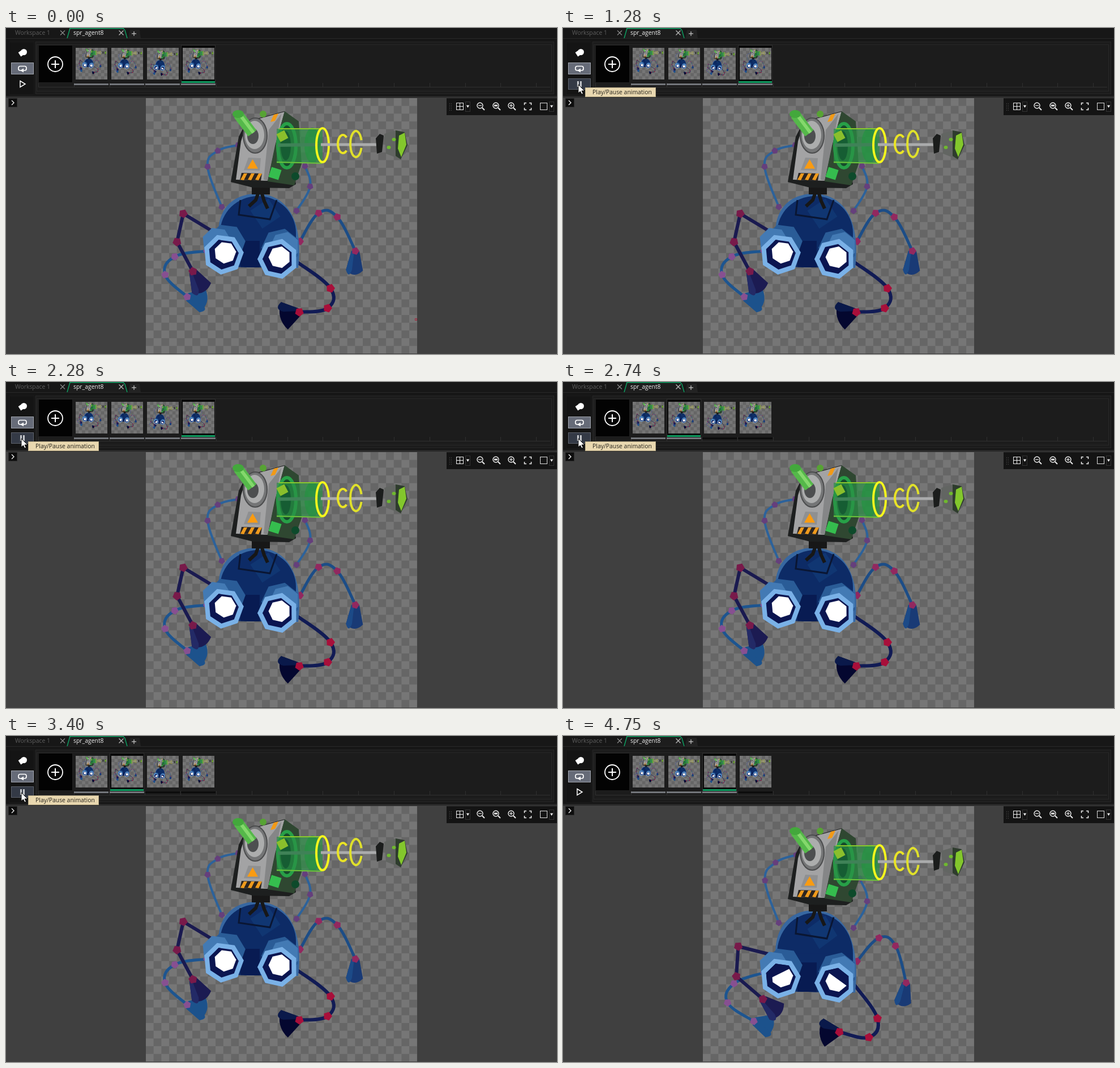
Recreate the animation shown at these times as an HTML page with a canvas. Size 973 px wide and 576 px high, loop 5.42 s.

```html
<!DOCTYPE html>
<html>
<head>
<meta charset="utf-8">
<style>
html, body { margin: 0; width: 100%; height: 100%; overflow: hidden; background: #404040; }
canvas { display: block; }
</style>
</head>
<body>
<canvas id="stage" width="973" height="576"></canvas>
<script>
const c = document.getElementById('stage').getContext('2d');
const LOOP = 5420, CELL = 13.68, PIXEL = 3.74;
const POSES = [-0.4, 0, 1, 0]; // 0 = middle, 1 = crouched
const { PI, sin, cos, floor, min, max } = Math;

const ease = v => { v = max(0, min(1, v)); return v * v * (3 - 2 * v); };

function box(x, y, w, h, fill, edge) {
  if (fill) { c.fillStyle = fill; c.fillRect(x, y, w, h); }
  if (edge) { c.lineWidth = 1; c.strokeStyle = edge; c.strokeRect(x + .5, y + .5, w - 1, h - 1); }
}
function trace(p) {
  c.beginPath();
  for (let i = 0; i < p.length; i += 2) c.lineTo(p[i], p[i + 1]);
}
function line(color, w, ...p) {
  trace(p);
  c.strokeStyle = color; c.lineWidth = w; c.stroke();
}
function shape(color, ...p) {
  trace(p);
  c.fillStyle = color; c.fill();
}
function ring(x, y, rx, ry, fill, edge, w = 1, gap = 0) {
  c.beginPath();
  c.ellipse(x, y, rx, ry, 0, gap, 2 * PI - gap);
  if (fill) { c.fillStyle = fill; c.fill(); }
  if (edge) { c.strokeStyle = edge; c.lineWidth = w; c.stroke(); }
}
function label(s, x, y, color) {
  c.font = '10.4px "Open Sans", sans-serif';
  c.fillStyle = color; c.fillText(s, x, y);
}
function checker(x, y, w, h, n) {
  box(x, y, w, h, '#666');
  c.fillStyle = '#767676';
  for (let j = 0; j * n < h; j++)
    for (let i = j % 2; i * n < w; i += 2) c.fillRect(x + i * n, y + j * n, n, n);
}
function shifted(dy, paint) {
  c.save(); c.translate(0, dy); paint(); c.restore();
}

// Regular polygon, first corner at angle rot.
function gon(x, y, r, n, rot) {
  return Array.from({ length: 2 * n }, (_, i) => {
    const a = rot + floor(i / 2) * 2 * PI / n;
    return i % 2 ? y + r * sin(a) : x + r * cos(a);
  });
}

// sag: how far the end moves in a crouch; bow: extra move of the middle.
const LIMBS = [
  { color: '#2c629b', joint: '#653f7c', w: 4, at: [[381, 316], [356, 245], [374, 217], [410, 207]], sag: [2, 3], bow: [0, 0], lift: 14 },
  { color: '#2c629b', joint: '#653f7c', w: 4, at: [[513, 323], [537, 280], [528, 244]], sag: [-4, 8], bow: [2, 0], lift: 16 },
  { color: '#1d5590', joint: '#875091', w: 5, at: [[355, 394], [298, 404], [281, 436], [320, 475]], sag: [17, 29], bow: [-2, 9], lift: 24,
    hand: { turn: [.25, .3], len: 28, half: 21, fill: '#1c528c', lit: '#1c528c' } },
  { color: '#1c4d87', joint: '#92285f', w: 5, at: [[519, 377], [552, 327], [585, 334], [617, 394]], sag: [-11, 42], bow: [11, 2], lift: 21,
    hand: { turn: [1.62, 1.75], len: 34, half: 15, fill: '#193a75', lit: '#1c4a87' } },
  { color: '#1a1a50', joint: '#781a4a', w: 6, at: [[366, 360], [313, 328], [302, 378], [330, 430]], sag: [23, 35], bow: [-13, 17], lift: 26, straight: true,
    hand: { turn: [1.09, .73], len: 33, half: 19, fill: '#1c1b52', lit: '#232a66' } },
  { color: '#111b55', joint: '#a80f3a', w: 6, at: [[515, 414], [573, 460], [568, 495], [518, 502]], sag: [-30, 21], bow: [-9, 17], lift: 26,
    hand: { turn: [2.9, 3.1], len: 27, half: 25, fill: '#04072f', lit: '#0a194a' } },
];

function drawHand([x, y], k, { turn, len, half, fill, lit }) {
  c.save();
  c.translate(x, y);
  c.rotate(turn[0] + (turn[1] - turn[0]) * k);
  for (const [color, side] of [[fill, -half], [lit, half * .3]]) {
    c.beginPath();
    c.moveTo(0, 7); c.lineTo(len, half);
    c.quadraticCurveTo(len + 16, (half + side) / 2, len, side);
    c.lineTo(0, side < 0 ? -7 : 2);
    c.fillStyle = color; c.fill();
  }
  c.restore();
}

function drawLimb({ color, joint, w, at, sag, bow, lift, straight, hand }, k) {
  const last = at.length - 1;
  const p = at.map(([x, y], i) => {
    const u = i / last, arc = sin(PI * u);
    return [x + k * (sag[0] * u + bow[0] * arc), y + k * (lift * (1 - u) + sag[1] * u + bow[1] * arc)];
  });
  const near = i => p[max(0, min(last, i))];
  const pull = straight ? 0 : 1 / 5;
  c.beginPath();
  c.moveTo(...p[0]);
  for (let i = 0; i < last; i++) {
    const [a, b, d, e] = [i - 1, i, i + 1, i + 2].map(near);
    c.bezierCurveTo(b[0] + (d[0] - a[0]) * pull, b[1] + (d[1] - a[1]) * pull,
      d[0] - (e[0] - b[0]) * pull, d[1] - (e[1] - b[1]) * pull, ...d);
  }
  c.strokeStyle = color; c.lineWidth = w; c.stroke();
  if (hand) drawHand(p[last], k, hand);
  for (const [x, y] of p.slice(hand && w > 5 ? 1 : 0)) shape(joint, ...gon(x, y, w + 2, 5, x));
}

function torso() {
  c.beginPath();
  c.moveTo(390, 422);
  c.bezierCurveTo(355, 345, 385, 293, 442, 293);
  c.bezierCurveTo(500, 293, 525, 345, 516, 424);
  c.fillStyle = '#3767a1'; c.fill();
  c.save();
  c.clip();
  ring(445, 362, 67, 65, '#0d2b66');
  box(378, 362, 134, 62, '#0d2b66');
  shape('#103672', ...gon(458, 328, 27, 4, .2));
  box(414, 376, 34, 50, '#081b52');
  c.restore();
  line('#0a1633', 3, 414, 304, 411, 330, 466, 338, 478, 304);
}

function eye(x, y, turn, tilt, k) {
  shape('#2a5c97', ...gon(x + 5, y - 20, 34, 7, turn));
  shape('#437ab4', ...gon(x + 12 * Math.sign(tilt), y - 22, 26, 7, turn));
  shape('#7ab1e7', ...gon(x, y, 36, 7, turn));
  shape('#0b1550', ...gon(x, y, 27, 7, turn));
  c.save();
  c.clip();
  shape('#fff', ...gon(x + 3, y - 3, 19.5, 7, turn));
  c.translate(x, y); c.rotate(tilt);
  box(-40, -40, 80, 15 + 17 * max(0, k), '#0b1550'); // eyelid
  c.restore();
}

function head() {
  box(434, 278, 32, 16, '#171717');
  line('#171717', 6, 446, 290, 441, 304, 429, 315);
  line('#171717', 6, 451, 290, 456, 306, 462, 319);
  shape('#1d1f1f', 411, 192, 425, 165, 492, 147, 512, 276, 500, 283, 436, 282, 397, 272);
  shape('#a3a3a4', 415, 200, 426, 166, 492, 148, 476, 205, 462, 270, 406, 268);
  shape('#858687', 464, 180, 486, 152, 476, 205, 462, 270, 455, 268);
  shape('#2f4731', 492, 147, 517, 165, 522, 240, 509, 278, 462, 271, 475, 208);
  shape('#f29a16', 467, 166, 473, 153, 481, 151, 475, 164);
  shape('#8f9091', 420, 251, 428, 229, 450, 230, 448, 252);
  shape('#f99b11', ...gon(435.5, 243, 11, 3, -PI / 2));
  shape('#2b2420', 413, 268, 416, 256, 452, 257, 450, 270);
  for (let x = 414; x < 450; x += 13) shape('#ef9a1c', x, 268, x + 6, 257, x + 12, 257, x + 6, 269);
  shape('#35bd4e', ...gon(475, 257, 13, 4, 1.1));
  ring(454, 152, 6, 6, '#57a334');
  ring(511, 262, 7, 7, '#0d4a2b');

  ring(440, 190, 21, 31, '#747576', '#4b4c4d', 2);
  ring(439, 189, 17, 25, '#acadad');
  ring(436, 191, 10, 14, '#4d4f50');
  line('#55b84a', 18, 410, 153, 435, 186);
  line('#84d86c', 6, 413, 153, 437, 185);
  ring(410, 152, 10, 7, '#43a83c');

  // barrel
  ring(496, 208, 16, 39, '#174a2b', '#27a047', 6);
  box(478, 178, 81, 61, 'rgba(42,145,70,.68)');
  ring(541, 207, 14, 31, 'rgba(36,148,66,.72)');
  ring(494, 208, 9, 26, 'rgba(18,82,48,.7)');
  shape('#8abf2c', ...gon(488, 191, 11, 4, .3));
  line('#89c82d', 2, 482, 178, 560, 178);
  line('#6cc33a', 2, 478, 237, 558, 239);
  line('#3f8257', 6, 480, 207, 552, 206);
  ring(559, 207, 11, 30, null, '#f5f61d', 4);
  line('#aaabac', 5, 556, 206, 655, 206);
  ring(595, 205, 9, 16, null, '#e9e326', 4, .8);
  ring(618, 205, 10, 23, null, '#dfe02b', 4, .3);

  // muzzle
  shape('#1b1d1c', 653, 195, 660, 187, 667, 190, 664, 219, 655, 222);
  shape('#626562', 668, 187, 688, 181, 704, 184, 706, 221, 694, 231, 671, 222);
  shape('#2e3c2d', 688, 181, 704, 184, 709, 207, 697, 232, 688, 226);
  shape('#83c72c', 694, 190, 704, 185, 707, 206, 698, 228, 692, 213);
  for (let i = 0; i < 2; i++) ring(685 - 9 * i, 197 + 14 * i, 3.5, 3, '#6fb82f');
}

function bot(k) {
  for (const l of LIMBS) drawLimb(l, k);
  c.save();
  c.translate(0, 293 + 15 * k); c.scale(1, 1 + .11 * k); c.translate(0, -293);
  torso();
  c.restore();
  shifted(28 * k, () => {
    eye(384, 400, 1.7, -.46, k);
    eye(480, 408, 1.34, .63, k);
  });
  shifted(16 * k, head);
}

function sprite(x, y, w, h, scale, cell, pose) {
  c.save();
  c.beginPath(); c.rect(x, y, w, h); c.clip();
  checker(x, y, w, h, cell);
  c.translate(x, y); c.scale(scale, scale); c.translate(-247, -124);
  bot(pose);
  c.restore();
}

function cross(x, y, r, color) {
  line(color, 1.2, x - r, y - r, x + r, y + r);
  line(color, 1.2, x + r, y - r, x - r, y + r);
}
function plus(x, y, r, color, w) {
  line(color, w, x - r, y, x + r, y);
  line(color, w, x, y - r, x, y + r);
}

function tabs() {
  box(0, 0, 973, 18, '#171717');
  label('Workspace 1', 16, 12, '#5e5e5e');
  cross(100, 8.5, 4, '#8a8a8a');
  shape('#1d1d1d', 108, 18, 113, 0, 206, 0, 214, 18);
  line('#0d9e61', 1.5, 108, 18, 113, .7, 207, .7, 210, 4, 214, 18);
  label('spr_agent8', 119, 12, '#f0f0f0');
  cross(203.5, 8.5, 4, '#b8b8b8');
  shape('#222', 216, 18, 219, 3, 236, 3, 238, 18);
  plus(226, 10, 4, '#ccc', 1.2);
  box(0, 18, 973, 1, '#292929');
}

function frameBar() {
  box(5, 24, 45, 94, '#141414', '#1b1b1b');
  box(52, 24, 916, 93, '#1c1c1c', '#272727');
  box(54, 29, 910, 83, null, '#282828');
  box(0, 120, 973, 3, '#292929');
  ring(31.5, 42.5, 5.5, 5.5, '#fff');
  shape('#fff', ...gon(27.5, 44.5, 6, 4, .2));
  box(9, 61, 40, 21, '#666b78', '#a1a5ad');
  c.beginPath(); c.roundRect(22, 67.5, 14, 7.5, 3);
  c.strokeStyle = '#fff'; c.lineWidth = 1.7; c.stroke();
  shape('#fff', ...gon(29, 75, 4, 3, PI));
  box(57, 30, 61, 67, '#030303', '#202020');
  ring(87, 64, 13, 13, null, '#fff', 1.8);
  plus(87, 64, 7, '#fff', 2);
  box(57, 104, 904, 1, '#303030');
  for (let x = 57; x < 960; x += 62.8) box(Math.round(x), 97, 1, 7, '#303030');
}

function viewBar() {
  box(4, 124, 16, 16, '#0d0d0d', '#262626');
  line('#eee', 1.4, 10, 128, 14, 132, 10, 136);
  box(778, 124, 195, 30, '#141414');
  for (let y = 133; y < 146; y += 3) { box(783, y, 1, 1, '#555'); box(786, y, 1, 1, '#555'); }
  box(795, 132, 13, 13, null, '#eee');
  plus(801.5, 138.5, 6, '#eee', 1);
  box(943, 132, 13, 13, null, '#ddd');
  for (const x of [815.5, 963.5]) {
    box(x - 4.5, 130, 9, 18, null, '#333');
    shape('#eee', ...gon(x, 138, 3, 3, PI / 2));
  }
  [838, 866, 893].forEach((x, i) => {
    ring(x - 1, 137, 5, 5, null, '#eee', 1.4);
    line('#eee', 2, x + 3, 141, x + 7, 145);
    if (i == 2) plus(x - 1, 137, 3, '#eee', 1.2);
    else line('#eee', i ? 3 : 1.2, x - 4, 137, x + 2, 137);
  });
  for (const sx of [-1, 1]) for (const sy of [-1, 1])
    line('#eee', 1.5, 921.5 + sx * 2.5, 138.5 + sy * 6, 921.5 + sx * 6, 138.5 + sy * 6, 921.5 + sx * 6, 138.5 + sy * 2.5);
}

function thumbs(cur) {
  POSES.forEach((pose, i) => {
    const x = 120 + 63 * i;
    box(x, 98, 61, 3, i <= cur ? '#73767b' : '#0c0c0c');
    if (i == cur) {
      box(x, 30, 61, 67, '#080808', '#303030');
      box(x + 1, 94, 59, 3, '#0d9c60');
    }
    sprite(x + 3, 35, 56, 56, .117, 5.6, pose);
  });
}

function playButton(hover, playing) {
  if (hover) box(9, 89, 40, 20, '#343a46', '#5d626b');
  if (playing) {
    box(25, 94, 3, 10, '#c4c6ca');
    box(30, 94, 3, 10, '#c4c6ca');
  } else {
    trace([25, 93.5, 34, 99, 25, 104.5]);
    c.closePath();
    c.strokeStyle = '#fff'; c.lineWidth = 1.5; c.stroke();
  }
}

const bezier = (v, a, m, b) => a.map((s, i) => (1 - v) ** 2 * s + 2 * v * (1 - v) * m[i] + v * v * b[i]);

function pointer(t) {
  if (t < 20 || t >= 4750) return null;
  if (t < 4310) return bezier(ease((t - 20) / 600), [836, 519], [520, 420], [27, 100]);
  return bezier(ease((t - 4310) / 440), [27, 100], [330, 205], [868, 580]);
}
function arrow(x, y) {
  trace([0, 0, 0, 15, 3.5, 12, 6, 17, 8.5, 16, 6, 11, 11, 11].map((v, i) => v + (i % 2 ? y : x)));
  c.closePath();
  c.fillStyle = '#fff'; c.fill();
  c.strokeStyle = '#111'; c.lineWidth = 1; c.stroke();
}
function brush(x, y) {
  const snap = (v, start) => start + floor((v - start) / PIXEL) * PIXEL;
  box(snap(x, 247), snap(y, 124), 4, 4, null, '#a52a40');
}

function draw(now) {
  const t = floor(now % LOOP / 20) * 20;
  const step = floor((min(t, 3940) - 1249) / 32.2) + 3;
  const cur = t < 640 ? 3 : (step % 4 + 4) % 4;
  const pos = pointer(t);
  box(0, 0, 973, 576, '#404040');
  box(0, 0, 973, 122, '#161616');
  tabs();
  frameBar();
  thumbs(cur);
  playButton(t >= 570 && t < 4350, t >= 640 && t < 3960);
  sprite(247, 124, 479, 451, 1, CELL, POSES[cur]);
  viewBar();
  const [x, y] = pos || [724, 513];
  if (t < 20 || pos && x > 247 && x < 726 && y > 124) brush(x, y);
  if (t >= 1160 && t < 3920) {
    box(39, 105, 125, 17, '#e9d8b0', '#b8aa86');
    label('Play/Pause animation', 52, 117, '#24211a');
  }
  if (pos) arrow(x, y);
}

function loop(now) {
  draw(now);
  requestAnimationFrame(loop);
}
draw(0);
requestAnimationFrame(loop);
</script>
</body>
</html>
```
